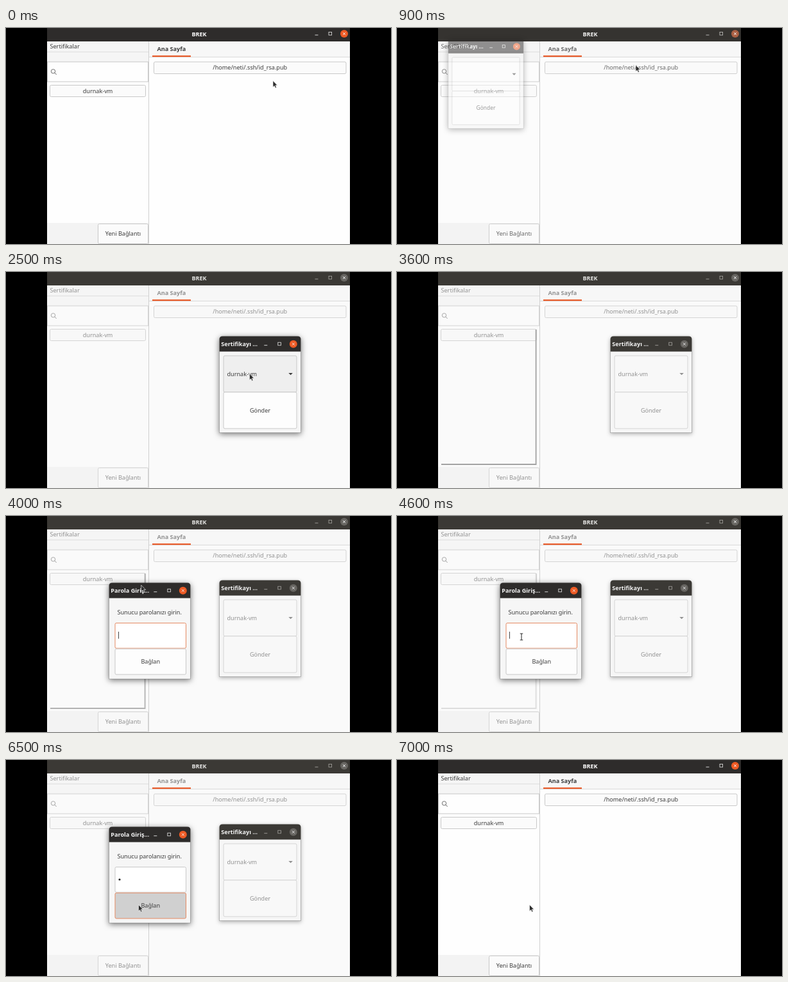
Recreate the animation shown at these times as an HTML page. Size 600 by 338 pixels, loop 7100 ms.

```html
<!DOCTYPE html>
<html lang="tr">
<head>
<meta charset="utf-8">
<title>Sertifikalar</title>
<style>
html, body { margin: 0; width: 100%; height: 100%; overflow: hidden; background: #000; }
svg { display: block; width: 100%; height: 100%; }
text { font: 9.1px "Noto Sans", "Open Sans", sans-serif; }
.b { font-weight: 700; }
</style>
</head>
<body>
<svg id="stage" viewBox="0 0 600 338"></svg>
<script>
const stage = document.getElementById('stage');
const LOOP = 7100, STEP = 100;
const HOST = 'durnak-vm';

// Pointer paths: [time, x, y]
const pointer = [
  [0, 416, 82.5], [500, 388, 64], [800, 380, 60], [900, 372, 58],
  [1300, 285, 34], [1400, 285, 34], [1500, 232, 8], [1600, 232, 8],
  [1700, 155, 44], [1900, 290, 92], [2100, 408, 114], [2200, 412, 115],
  [2400, 412, 115], [2500, 379.5, 159], [2800, 394, 212], [3200, 394, 212],
  [3900, 214, 92], [4500, 194, 189], [5100, 194, 189], [5500, 206.5, 226.5], [7100, 206.5, 226.5]
];
const sendPos = [
  [1700, 75, 12], [1800, 122, 35], [1900, 190, 66], [2000, 268, 88],
  [2100, 322, 98], [2200, 332.5, 100.5]
];
const listEdge = [
  [3200, 0], [3600, 1], [3800, 1], [4500, .35], [5000, .25], [5600, 0]
];

function track(keys, t) {
  if (t <= keys[0][0]) return keys[0].slice(1);
  for (let i = 1; i < keys.length; i++) {
    const a = keys[i - 1], b = keys[i];
    if (t <= b[0]) {
      const k = (t - a[0]) / (b[0] - a[0]);
      return a.slice(1).map((v, j) => v + (b[j + 1] - v) * k);
    }
  }
  return keys[keys.length - 1].slice(1);
}

const clamp = v => Math.max(0, Math.min(1, v));
const rise = (t, at) => clamp((t - at + STEP) / (2 * STEP));

// Blend from the inactive to the active colour
function mix(off, on, k) {
  const part = (c, i) => parseInt(c.substr(1 + 2 * i, 2), 16);
  return `rgb(${[0, 1, 2].map(i => Math.round(part(off, i) + (part(on, i) - part(off, i)) * k))})`;
}
const ink = k => mix('#929292', '#3c3c3c', k);
const edge = k => mix('#d4d4d4', '#c8c8c8', k);
const bar = k => mix('#3b3935', '#2e2c2b', k);

const rect = (x, y, w, h, fill, more = '') =>
  `<rect x="${x}" y="${y}" width="${w}" height="${h}" fill="${fill}" ${more}/>`;
const line = (d, color, w = 1) =>
  `<path d="${d}" fill="none" stroke="${color}" stroke-width="${w}"/>`;
const label = (x, y, s, fill, anchor = 'middle', cls = '') =>
  `<text x="${x}" y="${y}" fill="${fill}" text-anchor="${anchor}" class="${cls}">${s}</text>`;
const box = (x, y, w, h, fill, stroke) =>
  rect(x, y, w, h, fill, `rx="2" stroke="${stroke}"`);
const button = (x, y, w, h, s, k, fill, stroke = edge(k)) =>
  box(x, y, w, h, fill, stroke) + label(x + w / 2, y + h / 2 + 3.2, s, ink(k));

function controls(x, y, k) {
  const c = mix('#a5a39f', '#e6e6e6', k);
  return line(`M${x - 2.5} ${y + 2}h5`, c, .9) +
    rect(x + 19, y - 2.5, 4.6, 4.6, 'none', `stroke="${c}" stroke-width=".8"`) +
    `<circle cx="${x + 43}" cy="${y}" r="6" fill="${mix('#686662', '#ee5a24', k)}"/>` +
    line(`M${x + 41} ${y - 2}l4 4m0 -4l-4 4`, '#f0f0f0', .9);
}

function mainWindow(t) {
  const k = t < 3000 ? 1 - rise(t, 900) : rise(t, 6600);
  const face = mix('#fafafa', '#fefefe', k);
  const btn = mix('#f8f8f8', '#fbfbfb', k);
  const press = t >= 700 && t < 900, hover = t >= 400 && t < 700;
  const [e] = track(listEdge, t);
  return rect(64, 0, 472, 338, face) +
    rect(64, 0, 472, 21, bar(k)) +
    label(301, 13.2, 'BREK', mix('#e4e4e2', '#ffffff', k), 'middle', 'b') +
    controls(484, 9, k) +
    rect(64, 21, 158, 32, '#f5f5f5') +
    line('M64 37.5H222', '#dedede') +
    label(68.5, 32.3, 'Sertifikalar', ink(k), 'start') +
    rect(64.5, 53, 157, 31, face, `stroke="${edge(k)}"`) +
    `<circle cx="73.5" cy="67.8" r="3.2" fill="none" stroke="${mix('#9c9c9c', '#5c5c5c', k)}" stroke-width=".9"/>` +
    line('M75.8 70.1l2.9 2.9', mix('#9c9c9c', '#5c5c5c', k)) +
    button(68.5, 89.5, 149, 18, HOST, k, btn) +
    (e ? `<g opacity="${e}">${line('M216.6 90V301H69', '#a2a2a2', 1.8)}</g>` : '') +
    rect(64, 305, 158, 33, '#f3f3f3') +
    button(143.5, 306.5, 78, 31, 'Yeni Bağlantı', k, btn) +
    rect(223, 21, 313, 24, '#f7f7f7') +
    line('M223 45.5H536', '#dadada') +
    line('M222.5 21V338', '#d0d0d0') +
    label(257.8, 36.2, 'Ana Sayfa', ink(k), 'middle', 'b') +
    rect(228, 43, 60, 2.2, '#e95b2a') +
    button(230.5, 53, 299.5, 18.5, '/home/neti/.ssh/id_rsa.pub', k,
      press ? '#d6d6d6' : hover ? '#f3f3f3' : btn);
}

// Dialog frame; grow runs from 0 to 1 while it opens
function dialog(x, y, h, title, k, grow, body) {
  const w = 127, s = .85 + .15 * grow;
  const shade = `drop-shadow(0 2px ${3 + 2 * k}px rgba(0,0,0,${.3 + .25 * k}))`;
  return `<g opacity="${grow}" style="filter:${shade}" transform="translate(${x + w / 2} ${y + h / 2}) scale(${s}) translate(${-w / 2} ${-h / 2})">` +
    rect(0, 5, w, h - 5, '#f6f6f6') +
    `<path d="M0 24V5Q0 0 5 0H${w - 5}Q${w} 0 ${w} 5V24Z" fill="${bar(k)}"/>` +
    label(2.8, 15.5, title, '#f4f4f4', 'start', 'b') +
    controls(72.3, 12.2, k) + body +
    line(`M0 24V${h}H${w}V24`, 'rgba(0,0,0,.32)', .7) + '</g>';
}

function sendDialog(t) {
  if (t < 900 || t >= 6600) return '';
  const k = 1 - rise(t, 3300), [x, y] = track(sendPos, t);
  const face = mix('#f8f8f8', '#fdfdfd', k);
  const combo = t >= 2500 && t < 2700 ? '#efefef' : face;
  const send = t >= 3000 && t < 3200 ? '#d3d3d3' : t >= 2700 && t < 3000 ? '#f4f4f4' : face;
  return dialog(x, y, 151, 'Sertifikayı …', k, rise(t, 900),
    box(6.5, 30.5, 114, 57, combo, edge(k)) +
    (t >= 2500 ? label(12, 62, HOST, ink(k), 'start') : '') +
    `<path d="M107.8 57.4h6.6l-3.3 3.4z" fill="${ink(k)}"/>` +
    button(6.5, 87.5, 114, 57, 'Gönder', k, send));
}

function passDialog(t) {
  if (t < 3800 || t >= 6600) return '';
  const pressed = t >= 5600, hover = t >= 5400;
  const typed = t >= 5000;
  const caret = !pressed && t % 1200 < 1100;
  const accent = '#e58a62';
  return dialog(160.5, 104.5, 150.5, 'Parola Giriş…', 1, rise(t, 3800),
    label(63.2, 49.3, 'Sunucu parolanızı girin.', ink(1)) +
    box(9.5, 63, 110.5, 39.5, '#fff', pressed ? '#c8c8c8' : accent) +
    (typed ? '<circle cx="16.5" cy="82.5" r="1.6" fill="#222"/>' : '') +
    (caret ? line(`M${typed ? 20 : 15} 76.5v11`, '#333', .9) : '') +
    button(9.5, 103.5, 110.5, 40, 'Bağlan', 1,
      pressed ? '#d0d0d0' : hover ? '#f4f4f4' : '#fdfdfd', pressed ? accent : '#c8c8c8'));
}

function cursor(t) {
  if (t >= 3300 && t < 3900) return '';
  const [x, y] = track(pointer, t);
  let shape;
  if (t >= 1700 && t < 2200)
    shape = '<path d="M-4 3Q-6 0 -4.5 -1L-3.6 -.7V-2.8Q-2.6 -4.3 -1.4 -3.4Q0 -4.6 1.2 -3.4Q2.6 -4 3.2 -2.6Q5 -2.8 4.8 -.8Q4.8 2 3.4 4.4H-2.6Z" fill="#fff" stroke="#222"/>';
  else if (t >= 4400 && t < 5300)
    shape = line('M-2.3 -5H-.6L0 -4.4L.6 -5H2.3M0 -4.4V4.4M-2.3 5H-.6L0 4.4L.6 5H2.3', '#333', 1.1);
  else
    shape = '<path d="M0 0V10L2.3 8L3.8 11.4L5.5 10.6L4 7.3H7Z" fill="#2c2c2c" stroke="#fff" stroke-width=".6"/>';
  return `<g transform="translate(${x} ${y})">${shape}</g>`;
}

function draw(t) {
  stage.innerHTML = rect(0, 0, 600, 338, '#000') +
    '<clipPath id="desk"><rect x="64" width="472" height="338"/></clipPath>' +
    `<g clip-path="url(#desk)">${mainWindow(t) + sendDialog(t) + passDialog(t) + cursor(t)}</g>`;
}

let start, last = -1;
function tick(now) {
  start ??= now;
  const t = Math.floor(((now - start) % LOOP) / STEP) * STEP;
  if (t !== last) draw(last = t);
  requestAnimationFrame(tick);
}
draw(0);
requestAnimationFrame(tick);
</script>
</body>
</html>
```
